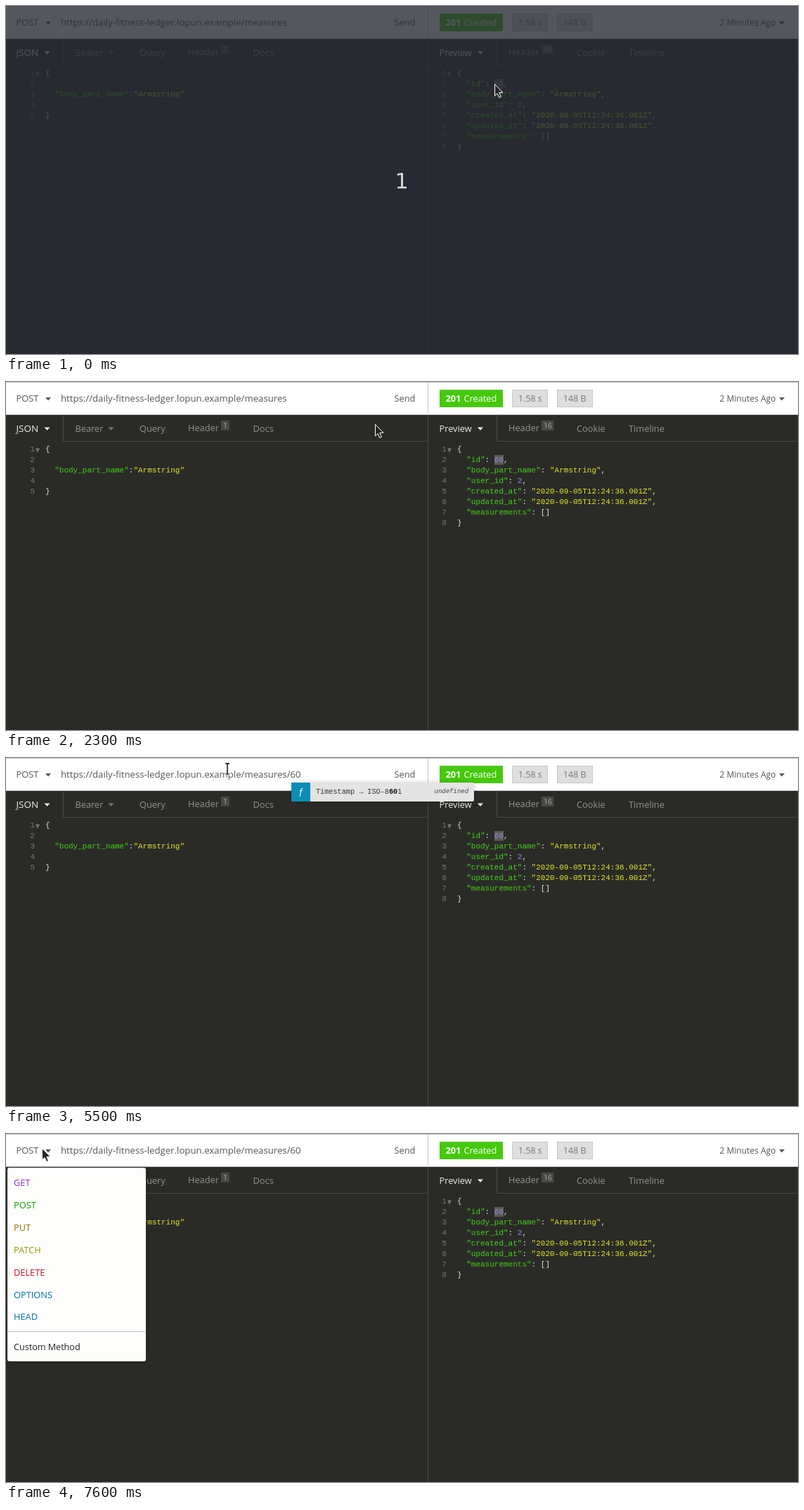
An HTML page with a canvas for the animation above (8 s loop, 1127x496 px).

```html
<!DOCTYPE html>
<html lang="en">
<head>
<meta charset="utf-8">
<title>API client</title>
<style>
html, body { margin: 0; width: 100%; height: 100%; overflow: hidden; background: #2a2b26; }
canvas { display: block; }
</style>
</head>
<body>
<canvas id="stage" width="1127" height="496"></canvas>
<script>
const c = document.getElementById('stage').getContext('2d');
const W = 1127, H = 496, LOOP = 8000, STEP = 100;
const SANS = '"Open Sans", "Noto Sans", sans-serif';
const MONO = '"Liberation Mono", monospace';
const LINE = '#484944', EDGE = '#c8c8c8', DIM = '#92938d', INK = '#555', LIGHT = '#eeeeea';
const URL_TEXT = 'https://daily-fitness-ledger.lopun.example/measures';
const ROW = 15, CHAR = 6.6;

// Pointer glides: start time, end time, destination
const GLIDES = [
  [600, 800, 700, 111], [900, 1400, 741, 153],
  [2100, 2300, 525, 60], [2500, 2800, 455, 24],
  [5200, 5500, 315, 15.5], [5600, 5900, 234, 26], [6100, 6200, 172, 33],
  [6600, 6900, 45, 28], [7100, 7200, 51, 20]
];
// What follows the address, and since when the caret blinks there
const EDITS = [{ at: 3000, tail: '' }, { at: 4000, tail: '/' }, { at: 4600, tail: '/60' }];

const REQUEST = ['{', '', '  "body_part_name":"Armstring"', '', '}'];
const RESPONSE = [
  '{', '  "id": 60,', '  "body_part_name": "Armstring",', '  "user_id": 2,',
  '  "created_at": "2020-09-05T12:24:36.001Z",',
  '  "updated_at": "2020-09-05T12:24:36.001Z",',
  '  "measurements": []', '}'
];
const METHODS = {
  GET: '#8a35b0', POST: '#129a06', PUT: '#947400', PATCH: '#96960c',
  DELETE: '#c01024', OPTIONS: '#0076a2', HEAD: '#0076a2'
};

const within = (t, from, to) => t >= from && t < to;

function rect(x, y, w, h, color) {
  c.fillStyle = color;
  c.fillRect(x, y, w, h);
}

function text(s, x, y, color, size = 12.8, family = SANS, style = '') {
  c.font = `${style} ${size}px ${family}`;
  c.fillStyle = color;
  c.fillText(s, x, y);
  return x + c.measureText(s).width;
}

function poly(points, color) {
  c.beginPath();
  points.forEach(([x, y]) => c.lineTo(x, y));
  c.closePath();
  c.fillStyle = color;
  c.fill();
}

function triangle(x, y, color, w = 8, h = 4.5) {
  poly([[x, y], [x + w, y], [x + w / 2, y + h]], color);
}

function panel(x, y, w, h, radius, fill) {
  c.save();
  c.shadowColor = 'rgba(0,0,0,.2)';
  c.shadowBlur = 6;
  c.beginPath();
  c.roundRect(x, y, w, h, radius);
  c.fillStyle = fill;
  c.fill();
  c.restore();
}

function badge(s, x, w) {
  rect(x, 11, w, 25, EDGE);
  rect(x + 1, 12, w - 2, 23, '#dedede');
  text(s, x + 9, 28, '#777', 12.4);
}

function headerTab(x, count) {
  const left = text('Header', x, 70, DIM) + 3;
  rect(left, 55, 6 + 5.7 * count.length, 14, LINE);
  text(count, left + 3, 66, '#aaaba6', 10.5);
}

function code(lines, x) {
  lines.forEach((line, row) => {
    const y = 99 + row * ROW;
    text(row + 1, x - 21.5, y, '#777872', 11, MONO);
    for (const { 0: s, index } of line.matchAll(/"\w+"(?=:)|"[^"]*"|\d+|[^"\d]+/g)) {
      const isKey = s[0] === '"' && line[index + s.length] === ':';
      const color = isKey ? '#42d21c' : s[0] === '"' ? '#e4e42a' : /\d/.test(s) ? '#a283dc' : '#e2e2de';
      text(s, x + index * CHAR, y, color, 11, MONO);
    }
  });
  triangle(x - 14, 94.5, '#777872', 6, 6);
}

function address(t) {
  const edit = EDITS.findLast(e => e.at <= t);
  const end = text(URL_TEXT + (edit?.tail ?? ''), 78, 28, INK, 13.2);
  if (edit && (t - edit.at) % 1100 < 400) rect(Math.round(end), 14, 1, 18, '#222');
}

function topBar(t) {
  rect(0, 0, W, 47, EDGE);
  rect(0, 1, W, 45, '#fff');
  if (within(t, 6900, 7400)) rect(0, 1, 75, 45, '#eee');
  rect(600, 0, 1, 47, EDGE);
  text('POST', 14.5, 28, INK);
  triangle(56, 22, INK);
  address(t);
  text('Send', 552.5, 28, INK);
  rect(617, 11, 90, 25, '#46c90c');
  text('201', 625.5, 28, '#fff', 12.8, SANS, 'bold');
  text('Created', 651.5, 28, '#fff');
  badge('1.58 s', 720, 51);
  badge('148 B', 784, 51);
  text('2 Minutes Ago', 1015.5, 28, INK, 12);
  triangle(1100, 22, INK);
}

function tabs() {
  rect(600, 47, 1, H, LINE);
  for (const [from, to] of [[81, 600], [698, W]]) {
    rect(from, 47, 1, 38, LINE);
    rect(from, 84, to - from, 1, LINE);
  }
  const labels = { Bearer: 98.5, Query: 190, Docs: 351.5, Cookie: 812, Timeline: 886 };
  for (const s in labels) text(s, labels[s], 71, DIM);
  triangle(145.5, 64.5, '#74756f');
  text('JSON', 14.5, 71, LIGHT, 13.5);
  triangle(54.5, 64.5, LIGHT);
  text('Preview', 616.5, 71, LIGHT);
  triangle(671, 64.5, LIGHT);
  headerTab(259, '1');
  headerTab(715, '16');
}

function contextMenu(pointerY) {
  panel(701, 113, 90, 81, 0, EDGE);
  rect(702, 114, 88, 79, '#f9f9f9');
  rect(702, pointerY < 141 ? 116 : 141, 88, 25, '#dcdcdc');
  ['Cut', 'Copy', 'Paste'].forEach((s, i) => text(s, 728, 134 + i * 25, '#343a42', 15));
}

function suggestion() {
  panel(406, 35, 260, 27, 2, '#e4e4e4');
  rect(406, 35, 27, 27, '#0a8db6');
  text('ƒ', 416, 52, '#fff', 13, MONO);
  let x = text('Timestamp → ISO-8', 441, 51, '#333', 10.2, MONO);
  x = text('60', x, 51, '#111', 10.2, MONO, 'bold');
  text('1', x, 51, '#333', 10.2, MONO);
  text('undefined', 609.5, 50, '#444', 9, MONO, 'italic');
}

function methodMenu(alpha) {
  c.globalAlpha = alpha;
  panel(2, 48, 197, 276, 3, '#fdfdfc');
  Object.entries(METHODS).forEach(([s, color], i) =>
    text(s, 11, 74.3 + i * 31.85, color, 12.8, SANS, '500'));
  rect(3, 281, 195, 1, '#bbb');
  text('Custom Method', 11, 308, '#222', 12.6, SANS, '500');
  c.globalAlpha = 1;
}

function pointerAt(t) {
  const now = Math.floor(t / STEP) * STEP;
  let x = 695, y = 111;
  for (const [from, to, endX, endY] of GLIDES) {
    const k = Math.min(1, Math.max(0, (now - from) / (to - from)));
    x += (endX - x) * k;
    y += (endY - y) * k;
  }
  return [x, y];
}

function beam() {
  for (const [grow, color] of [[1, '#fff'], [0, '#111']]) {
    rect(-.5 - grow, -8, 1 + 2 * grow, 16, color);
    for (const y of [-8, 7]) rect(-3 - grow, y - grow, 6 + 2 * grow, 1 + 2 * grow, color);
  }
  rect(-.5, -8, 1, 16, '#111');
  rect(-3, -8, 6, 1, '#111');
}

function arrow() {
  poly([[.5, .5], [.5, 17], [4, 13.6], [6.7, 19.6], [9.4, 18.4], [6.9, 12.5], [12, 12.3]], '#26262a');
  c.strokeStyle = '#fff';
  c.stroke();
}

function draw(t) {
  const [x, y] = pointerAt(t);
  rect(0, 0, W, H, '#2a2b26');
  topBar(t);
  tabs();
  rect(695, 104, 13, 14, '#5a5b58');
  code(REQUEST, 56);
  code(RESPONSE, 642);
  if (within(t, 800, 2000)) contextMenu(y);
  if (within(t, 5000, 7400)) suggestion();
  if (t >= 7400) methodMenu(Math.min(1, (Math.floor(t / STEP) - 73) / 3));
  if (t < 500) {
    rect(0, 0, W, H, 'rgba(39,42,51,.79)');
    text('1', 553.5, 260, '#dcd6d4', 30, '"DejaVu Sans", sans-serif');
  }
  c.save();
  c.translate(x, y);
  within(t, 2800, 6700) ? beam() : arrow();
  c.restore();
}

const start = performance.now();
function tick() {
  draw((performance.now() - start) % LOOP);
  requestAnimationFrame(tick);
}
tick();
</script>
</body>
</html>
```
